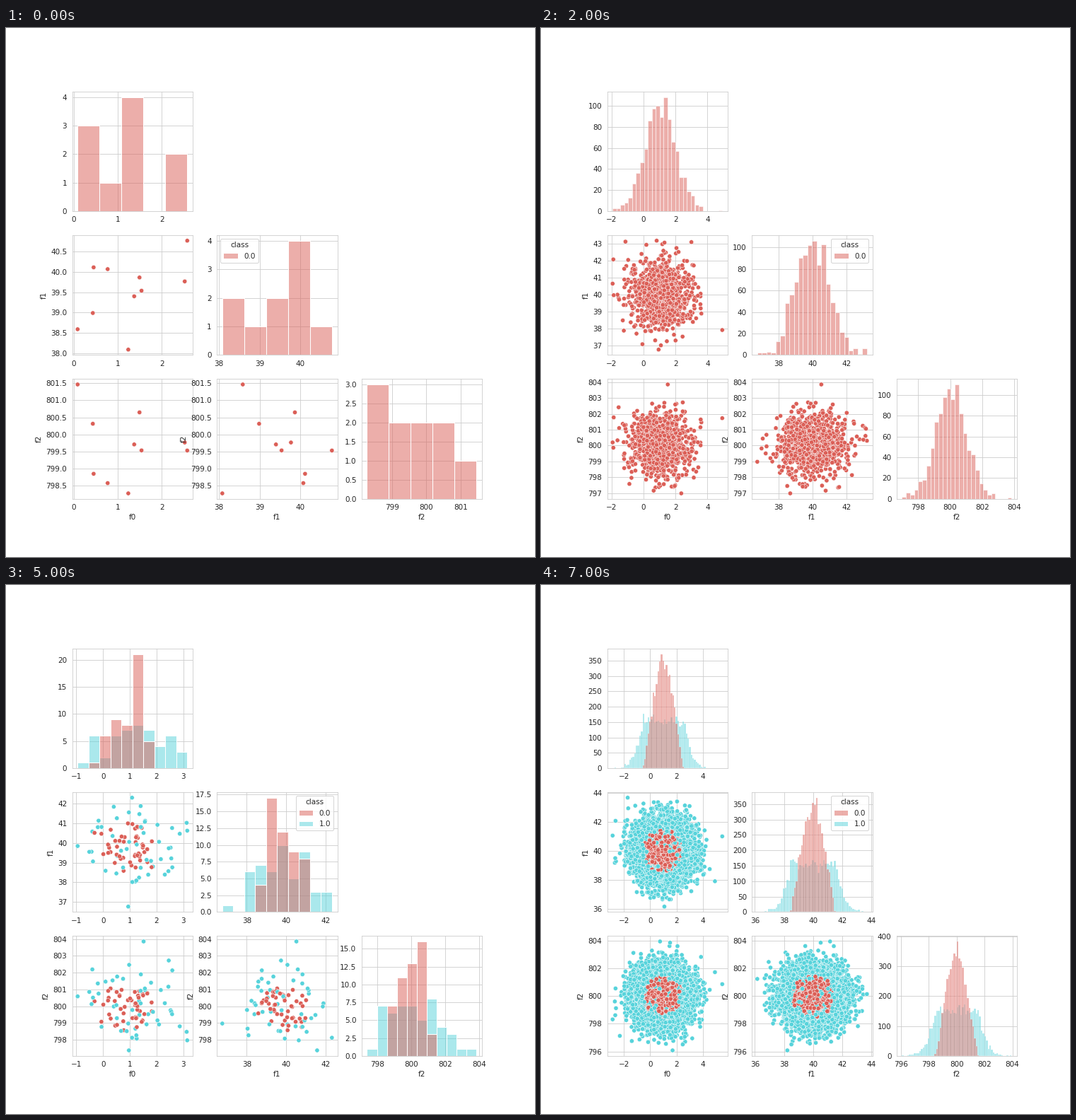
Recreate the animation shown at these times as a matplotlib script. Size 748 by 748 pixels, loop 8 s.

```python
import numpy as np
import matplotlib.pyplot as plt
from matplotlib.animation import FuncAnimation
from matplotlib.colors import to_rgba
from matplotlib.patches import Patch

plt.rcParams.update({
    "font.family": "DejaVu Sans",
    "font.size": 10,
    "text.color": ".15",
    "axes.labelcolor": ".15",
    "axes.edgecolor": ".8",
    "axes.grid": True,
    "axes.axisbelow": True,
    "grid.color": ".8",
    "grid.linestyle": "-",
    "lines.solid_capstyle": "round",
    "xtick.color": ".15",
    "ytick.color": ".15",
    "xtick.bottom": False,
    "ytick.left": False,
})

SIZES = [10, 100, 1000, 10000]
MEAN = np.array([1, 40, 800])
NAMES = ["f0", "f1", "f2"]
COLORS = [(.86, .3712, .34), (.34, .8288, .86)]


def make_data(n, classes):
    """Gaussian cloud split into equally large shells around its mean."""
    rng = np.random.RandomState(42)
    points = rng.standard_normal((n, 3))
    points = points[np.argsort((points ** 2).sum(axis=1))]
    labels = np.arange(n) * classes // n
    order = np.arange(n)
    rng.shuffle(order)
    return points[order] + MEAN, labels[order]


def draw_hist(ax, values, labels, classes):
    edges = np.histogram_bin_edges(values, "auto")
    width = edges[1] - edges[0]
    bars = []
    for k in reversed(range(classes)):
        counts, _ = np.histogram(values[labels == k], edges)
        bars += ax.bar(edges[:-1], counts, np.diff(edges), align="edge",
                       facecolor=to_rgba(COLORS[k], .5), edgecolor="w")
    # thin bars get thinner outlines
    ax.autoscale_view()
    ends = ax.transData.transform([(edges[0], 0), (edges[0] + width, 0)])
    points = (ends[1, 0] - ends[0, 0]) * 72 / fig.dpi
    for bar in bars:
        bar.set_linewidth(min(1, .1 * points))


def draw_scatter(ax, x, y, labels):
    ax.scatter(x, y, s=36, c=np.array(COLORS)[labels],
               edgecolors="w", linewidths=.48)


def draw_legend(ax, classes):
    handles = [Patch(facecolor=to_rgba(c, .5), edgecolor="w", linewidth=1)
               for c in COLORS[:classes]]
    ax.legend(handles, ["0.0", "1.0"][:classes], title="class", loc="best")


def update(frame):
    classes = 1 + frame // len(SIZES)
    data, labels = make_data(SIZES[frame % len(SIZES)], classes)
    for row in range(3):
        for col in range(row + 1):
            ax = axes[row, col]
            ax.clear()
            if row == col:
                draw_hist(ax, data[:, col], labels, classes)
            else:
                draw_scatter(ax, data[:, col], data[:, row], labels)
                ax.set_ylabel(NAMES[row])
            if row == 2:
                ax.set_xlabel(NAMES[col])
    draw_legend(axes[1, 1], classes)
    return []


fig, axes = plt.subplots(3, 3, figsize=(10, 10), dpi=74.8)
for row, col in zip(*np.triu_indices(3, 1)):
    axes[row, col].remove()

anim = FuncAnimation(fig, update, frames=2 * len(SIZES), interval=1000,
                     repeat=True, repeat_delay=0)
plt.show()
```
